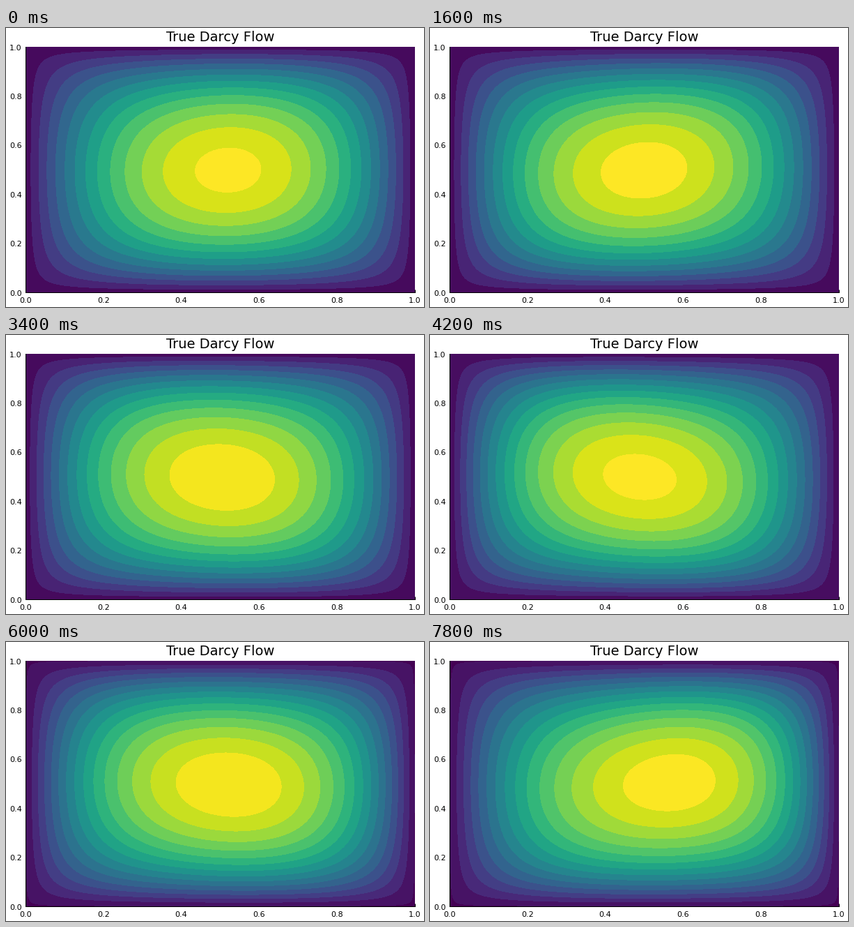
These frames come from a looping animation (600 by 400 pixels, 8000 ms). A matplotlib script:

```python
import numpy as np
import matplotlib.pyplot as plt
from matplotlib.animation import FuncAnimation

W, H, DPI = 600, 400, 100
LEFT, RIGHT, TOP, BOTTOM = 28, 587, 27, 379
STEP, FRAMES = 200, 40

plt.rcParams["font.family"] = "DejaVu Sans"

# A few poses of the flow: how far the peak drifts sideways and how it tilts.
TIMES = np.array([0, .8, 2.4, 3.4, 5.2, 6.8, 7.8])
DRIFT = np.array([.021, .009, -.0055, .005, -.0265, .07, .065])
TILT = np.array([-.006, -.010, -.012, .0125, .02, 0, -.016])

x, y = np.meshgrid(np.linspace(0, 1, 161), np.linspace(0, 1, 141))


def glide(t, values):
    """Smooth cubic path through the poses."""
    slopes = np.gradient(values, TIMES)
    i = min(np.searchsorted(TIMES, t, side="right") - 1, len(TIMES) - 2)
    d = TIMES[i + 1] - TIMES[i]
    s = (t - TIMES[i]) / d
    blend = s * s * (3 - 2 * s)
    return (values[i] + blend * (values[i + 1] - values[i])
            + d * s * (1 - s) * ((1 - s) * slopes[i] - s * slopes[i + 1]))


def smoothstep(t, start, end):
    s = np.clip((t - start) / (end - start), 0, 1)
    return s * s * (3 - 2 * s)


def wave(k, v):
    return np.sin(k * np.pi * v)


def pressure(u, v):
    """Poisson solution on the unit square, scaled to a peak of 1."""
    p = u * (1 - u) / 2
    for k in range(1, 40, 2):
        p = p - (4 / (np.pi * k)**3 * wave(k, u)
                 * np.cosh(k * np.pi * (v - .5)) / np.cosh(k * np.pi / 2))
    return p / 0.07367


def flow(t):
    skew = .0095 - .0031 * t
    u = x - glide(t, DRIFT) * wave(1, x) - skew * wave(2, x) + .0015 * wave(3, x)
    v = y - (glide(t, TILT) * wave(2, x) - .003 * wave(1, x)) * wave(1, y)
    return pressure(u, v)


def bands(t):
    """Contour levels and the colour of each band between them."""
    rise = smoothstep(t, 3.4, 5.2)
    first = .74 + .39 * rise
    peak = 13.1 + .14 * t + rise * (2.55 - .25 * t)
    levels = (np.arange(-2, 16) + first) / peak
    shades = np.clip(levels[:-1] + .58 / peak, 0, 1)
    return levels, plt.cm.viridis(shades)


fig = plt.figure(figsize=(W / DPI, H / DPI), dpi=DPI, facecolor="white")
ax = fig.add_axes([LEFT / W, 1 - BOTTOM / H,
                   (RIGHT - LEFT) / W, (BOTTOM - TOP) / H])
ticks = np.linspace(0, 1, 6)
ax.set(xlim=(0, 1), ylim=(0, 1), xticks=ticks, yticks=ticks)
ax.set_axisbelow(True)
ax.tick_params(direction="in", length=2.9, width=.72,
               labelbottom=False, labelleft=False)
ax.spines[["top", "right"]].set_visible(False)
ax.spines[["left", "bottom"]].set_linewidth(.72)


def label(px, py, text, size, ha="center"):
    fig.text(px / W, 1 - py / H, text, fontsize=size, color="black",
             ha=ha, va="baseline")


label((LEFT + RIGHT) / 2, 18.6, "True Darcy Flow", 14)
for v in ticks:
    label(LEFT + v * (RIGHT - LEFT), 394.5, f"{v:.1f}", 8)
    label(22.5, BOTTOM - v * (BOTTOM - TOP) + 4.5, f"{v:.1f}", 8, ha="right")


def draw(frame):
    for c in list(ax.collections):
        c.remove()
    t = frame * STEP / 1000
    levels, colors = bands(t)
    return [ax.contourf(x, y, flow(t), levels=levels, colors=colors)]


anim = FuncAnimation(fig, draw, frames=FRAMES, interval=STEP,
                     repeat=True, repeat_delay=0, blit=False)
plt.show()
```
